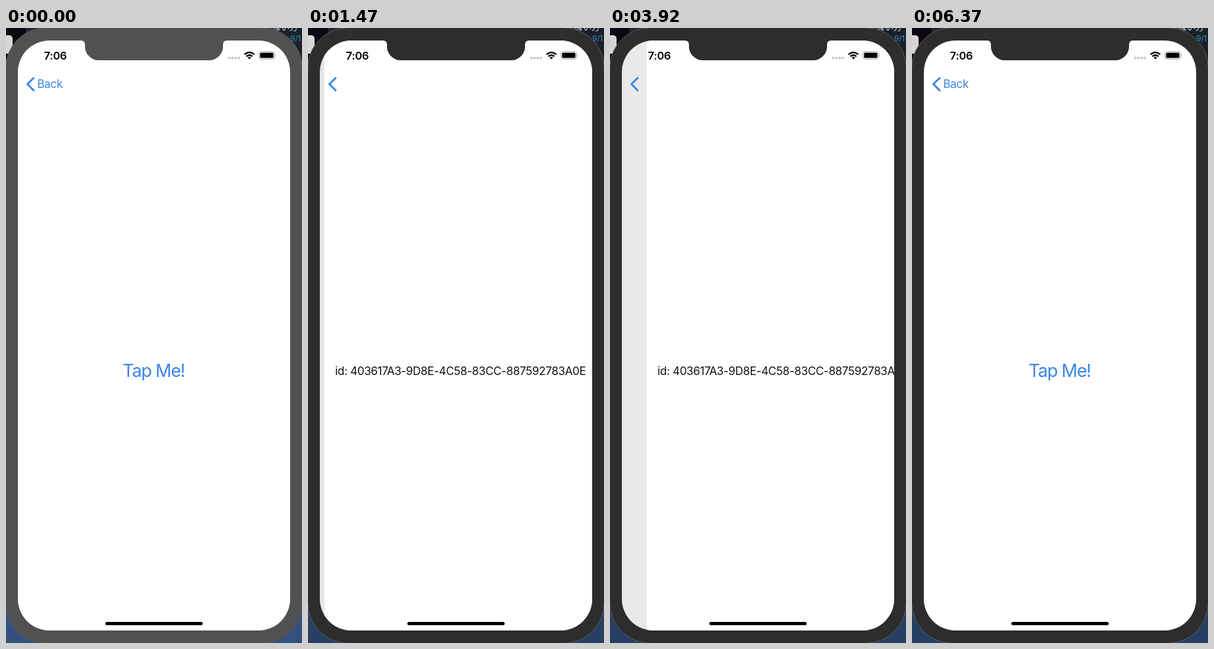
An HTML page that plays this animation: 450x934 px, repeating every 6440 ms.

```html
<!DOCTYPE html>
<html lang="en">
<head>
<meta charset="utf-8">
<title>Push and pop</title>
<style>
  html, body { margin: 0; width: 100%; height: 100%; overflow: hidden; background: #0d0814; }
  svg { display: block; width: 100%; height: 100%; }
  text { font-family: Inter, Roboto, sans-serif; font-size: 17px; letter-spacing: -0.3px; }
  .tint { fill: #3a86e6; }
  .cjk { font: 13px "Noto Sans CJK JP", "Noto Sans CJK", sans-serif; letter-spacing: 0; }
</style>
</head>
<body>
<svg viewBox="0 0 450 934">
  <defs>
    <clipPath id="screen"><rect x="18" y="19" width="414" height="896" rx="48"/></clipPath>
    <clipPath id="labelArea"><path d="M43 74L31 85.5L43 97H200V74Z"/></clipPath>
  </defs>

  <!-- desktop behind the phone -->
  <rect width="450" height="934" fill="#0d0814"/>
  <rect x="30" width="420" height="60" fill="#25262d"/>
  <rect x="390" width="60" height="60" fill="#1a202b"/>
  <rect x="-20" y="11" width="30" height="28" rx="5" fill="#d6d6d8"/>
  <text class="cjk" x="405" y="3" fill="#d5d8dc">ない方</text>
  <text x="432" y="20" fill="#3d8fb5" style="font-size:12px">9/1</text>
  <rect id="sea" y="860" width="450" height="74"/>

  <rect id="bezel" x="-.5" y="-.5" width="451" height="935" rx="62" stroke="#5c5c5e"/>

  <g clip-path="url(#screen)">
    <rect x="18" y="19" width="414" height="896" fill="#fff"/>
    <g id="home">
      <text id="tap" class="tint" x="224.4" y="530" text-anchor="middle" style="font-size:27px;letter-spacing:-1.2px">Tap Me!</text>
    </g>
    <rect id="dim" x="18" y="19" width="414" height="896"/>
    <g id="detail">
      <rect x="18" y="19" width="414" height="896" fill="#fff"/>
      <text x="224.8" y="526.5" text-anchor="middle" fill="#111">id: 403617A3-9D8E-4C58-83CC-887592783A0E</text>
    </g>
    <g clip-path="url(#labelArea)">
      <text id="back" class="tint" x="47.5" y="91">Back</text>
    </g>
    <path id="chevron" d="M42 76L32.5 85.3L42 94.7" fill="none" stroke="#3a86e6" stroke-width="2.9" stroke-linecap="round" stroke-linejoin="round"/>

    <!-- status bar -->
    <text x="75" y="47.5" text-anchor="middle" style="font-size:16.5px;font-weight:600">7:06</text>
    <g fill="#c9c9cb">
      <circle cx="339.3" cy="45.5" r="2"/><circle cx="344.2" cy="45.5" r="2"/>
      <circle cx="349.1" cy="45.5" r="2"/><circle cx="354" cy="45.5" r="2"/>
    </g>
    <g fill="none" stroke="#000" stroke-width="2.4">
      <path d="M362.6 40.2Q370 33.6 377.4 40.2"/>
      <path d="M365.4 43.2Q370 39.2 374.6 43.2"/>
    </g>
    <path d="M367.4 45Q370 43 372.6 45L370 47.6Z"/>
    <rect x="384.5" y="35.7" width="24" height="11.6" rx="3.2" fill="none" stroke="#a6a6a6"/>
    <rect x="386.2" y="37.5" width="20.4" height="8" rx="1.6"/>
    <path d="M409.6 39.5Q411.2 41.5 409.6 43.5Z" fill="#a6a6a6"/>
    <rect x="151" y="902" width="148" height="5" rx="2.5"/>
  </g>
  <path id="notch" d="M114 18V19Q120 19 120 25V28A21 21 0 0 0 141 49H309A21 21 0 0 0 330 28V25Q330 19 336 19V18Z"/>
</svg>
<script>
const LOOP = 6440, TICK = 70;
const PUSHES = [1099, 3689], POPS = [2789, 5379];
const SLIDE = 540, PARALLAX = 124, WIDTH = 414;
const el = id => document.getElementById(id);
const clamp = v => Math.min(1, Math.max(0, v));
const sum = (list, fn) => list.reduce((total, v) => total + fn(v), 0);

// cubic-bezier(.36, .66, .04, 1)
function ease(x) {
  if (x <= 0 || x >= 1) return clamp(x);
  const bezier = (a, b, u) => 3 * a * u * (1 - u) ** 2 + 3 * b * u * u * (1 - u) + u ** 3;
  let lo = 0, hi = 1;
  for (let i = 0; i < 24; i++) {
    const mid = (lo + hi) / 2;
    if (bezier(.36, .04, mid) < x) lo = mid; else hi = mid;
  }
  return bezier(.66, 1, lo);
}

// Drops at touch down, then recovers.
function tapOpacity(t) {
  const press = [910, 3500].find(s => t >= s && t < s + 350);
  return press === undefined ? 1 : .45 + .55 * clamp((t - press) / 380);
}

// Fades while held and comes back as the page slides away.
function chevronOpacity(t) {
  const fade = (down, up) => clamp((t - down) / 140) * (1 - clamp((t - up) / 250));
  return 1 - .6 * (fade(2500, POPS[0]) + fade(5160, POPS[1]));
}

function draw(t) {
  const slide = start => ease((t - start) / SLIDE);
  const p = clamp(sum(PUSHES, slide) - sum(POPS, slide));
  const popping = POPS.some(s => t >= s && t < s + SLIDE);
  const shift = (id, x) => el(id).setAttribute("transform", `translate(${x.toFixed(2)} 0)`);
  const fade = (id, v) => el(id).setAttribute("opacity", v.toFixed(3));

  shift("home", -PARALLAX * p);
  shift("detail", WIDTH * (1 - p));
  shift("back", -78 * p);
  fade("dim", popping ? 0 : .095 * p);
  fade("back", clamp(1 - 1.6 * p * p));
  fade("tap", tapOpacity(t));
  fade("chevron", chevronOpacity(t));

  const shell = t < 70 ? "#515151" : t < 140 ? "#363636" : "#2d2d2d";
  el("bezel").setAttribute("fill", shell);
  el("notch").setAttribute("fill", shell);
  el("sea").setAttribute("fill", t < 70 ? "#34507f" : "#273f62");
}

const start = performance.now();
function frame(now) {
  const t = Math.max(0, now - start) % LOOP;
  draw(Math.floor(t / TICK) * TICK);
  requestAnimationFrame(frame);
}
draw(0);
requestAnimationFrame(frame);
</script>
</body>
</html>
```
